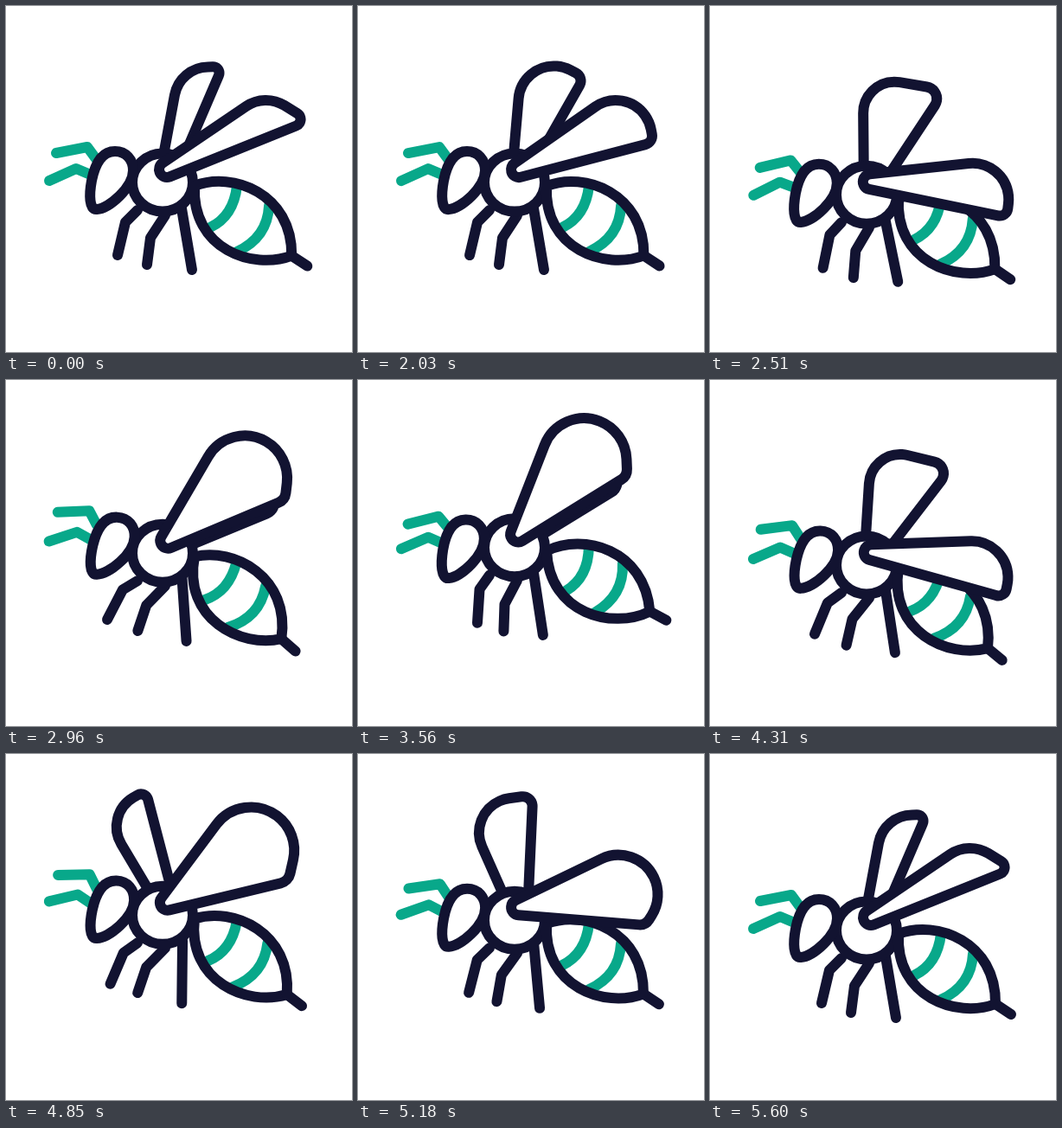
An HTML page with a canvas that plays this animation: 400x400 px, repeating every 5630 ms.

```html
<!DOCTYPE html>
<html lang="en">
<head>
<meta charset="utf-8">
<title>Bee</title>
<style>
  html, body { margin: 0; width: 100%; height: 100%; overflow: hidden; background: #fff; }
  canvas { display: block; width: 400px; height: 400px; }
</style>
</head>
<body>
<canvas id="stage" width="400" height="400"></canvas>
<script>
const ctx = document.getElementById('stage').getContext('2d');
const NAVY = '#121331', TEAL = '#08a88a';
const LOOP = 5630, HOLD = 2000, STEP = 30, FLIGHT = 3600, BEAT = 300;
const RAD = Math.PI / 180;

// Tracks are [time, value] pairs, joined by cosine easing
const BOB = [[0, 0], [600, 15], [1260, -18], [2160, 13], [2900, -18], [3600, 0]];
const SWING = [[0, 0], [400, -3], [1050, 15], [1650, -11], [2580, 14], [3300, 0]];

// Lift is the angle of the rounded tip; spread is how far the lower corner hangs below it
const FRONT = {
  x: 186, y: 189, tip: 120, reach: 154, shrink: 1.35, round: 42, bulge: .5,
  lift: [[30, 19], [90, 70], [225, -13], [300, 19]],
  spread: [[0, -2.6], [75, 16], [150, 16], [225, 0], [300, -2.6]]
};
const BACK = {
  x: 187, y: 195, tip: 95, reach: 126, shrink: .5, round: 43, bulge: -.5,
  lift: [[0, 61], [30, 65], [60, 43], [150, 106], [240, 61]],
  spread: [[0, -5], [60, 13], [150, -2], [210, 14], [300, -5]]
};

const ANTENNAE = [
  { d: 'M105 178L94 163L58 170', x: 105, y: 178, lag: 120, gain: .8 },
  { d: 'M100 196L81 188L50 202', x: 100, y: 196, lag: 200, gain: .8 }
];
const LEGS = [
  { d: 'M152 236L138 250L129 288', x: 152, y: 236, lag: 0, gain: 1 },
  { d: 'M184 242L167 268L163 299', x: 184, y: 242, lag: 90, gain: .95 },
  { d: 'M203 234L204 240L215 305', x: 204, y: 240, lag: 200, gain: .75 }
];
const HEAD = 'M105 235C96 236 96 218 99 202C103 182 111 168 126 168' +
  'C139 168 147 178 147 190C147 210 119 234 105 235Z';
const ABDOMEN = 'M218 208C262 191 331 217 330 289C285 306 214 281 218 208Z';
const STRIPES = 'M267 208Q263 243 236 256M304 231Q302 268 267 284';
const STING = 'M330 289L348 301';

function ease(track, t) {
  const i = track.findIndex(key => t < key[0]);
  if (i < 0) return track[track.length - 1][1];
  if (i === 0) return track[0][1];
  const [t0, v0] = track[i - 1], [t1, v1] = track[i];
  return v0 + (v1 - v0) * (1 - Math.cos(Math.PI * (t - t0) / (t1 - t0))) / 2;
}

function line(d, color = NAVY, fill = false) {
  const path = new Path2D(d);
  if (fill) ctx.fill(path);
  ctx.strokeStyle = color;
  ctx.stroke(path);
}

function turned(x, y, deg, draw) {
  ctx.save();
  ctx.translate(x, y);
  ctx.rotate(deg * RAD);
  ctx.translate(-x, -y);
  draw();
  ctx.restore();
}

function shifted(dy, draw) {
  ctx.save();
  ctx.translate(0, dy);
  draw();
  ctx.restore();
}

function limb(part, t, color) {
  const deg = part.gain * ease(SWING, t - part.lag);
  turned(part.x, part.y, deg, () => line(part.d, color));
}

// Direction of the outer tangent point shared by two circles
function tangent(a, b) {
  const dx = b.x - a.x, dy = b.y - a.y;
  const k = (a.r - b.r) / Math.hypot(dx, dy);
  return Math.atan2(dy, dx) - Math.acos(Math.max(-1, Math.min(1, k)));
}

// A band wrapped around three circles: root, tip and lower corner
function wing(w, t) {
  const lift = ease(w.lift, t), spread = ease(w.spread, t);
  const at = (deg, dist, r) => ({
    x: w.x + dist * Math.cos(deg * RAD), y: w.y - dist * Math.sin(deg * RAD), r
  });
  const root = at(0, 0, 9);
  const tip = at(lift, w.tip - .4 * spread, w.round + w.bulge * spread);
  const corner = at(lift - spread, w.reach - w.shrink * spread, 9 + .35 * spread);
  const gap = Math.hypot(tip.x - corner.x, tip.y - corner.y);
  tip.r = Math.min(tip.r, gap + corner.r - .5);

  const rings = [root, tip, corner];
  ctx.beginPath();
  rings.forEach((c, i) => {
    const from = tangent(rings[(i + 2) % 3], c), to = tangent(c, rings[(i + 1) % 3]);
    const span = ((to - from) % (2 * Math.PI) + 2 * Math.PI) % (2 * Math.PI);
    ctx.arc(c.x, c.y, c.r, from, from + span);
  });
  ctx.closePath();
  ctx.fill();
  ctx.strokeStyle = NAVY;
  ctx.stroke();
}

function bee(t) {
  const swing = ease(SWING, t);
  const flap = w => turned(181, 203, .38 * swing, () => wing(w, t % BEAT));

  shifted(ease(BOB, t), () => {
    flap(BACK);
    LEGS.forEach(leg => limb(leg, t, NAVY));

    ctx.beginPath();
    ctx.ellipse(181, 204, 35, 33.5, 0, 0, 2 * Math.PI);
    ctx.fill();
    ctx.strokeStyle = NAVY;
    ctx.stroke();

    turned(217, 207, .5 * ease(SWING, t + 90), () => {
      ctx.fill(new Path2D(ABDOMEN));
      line(STRIPES, TEAL);
      line(ABDOMEN);
      line(STING);
    });

    shifted(-.45 * swing, () => {
      ANTENNAE.forEach(a => limb(a, t, TEAL));
      turned(104, 235, .15 * swing, () => line(HEAD, NAVY, true));
    });

    flap(FRONT);
  });
}

function frame(now) {
  const t = Math.floor((now % LOOP - HOLD) / STEP) * STEP;
  ctx.fillStyle = '#fff';
  ctx.fillRect(0, 0, 400, 400);
  ctx.lineWidth = 12;
  ctx.lineCap = ctx.lineJoin = 'round';
  bee(Math.max(0, Math.min(FLIGHT, t)));
  requestAnimationFrame(frame);
}
frame(0);
</script>
</body>
</html>
```
